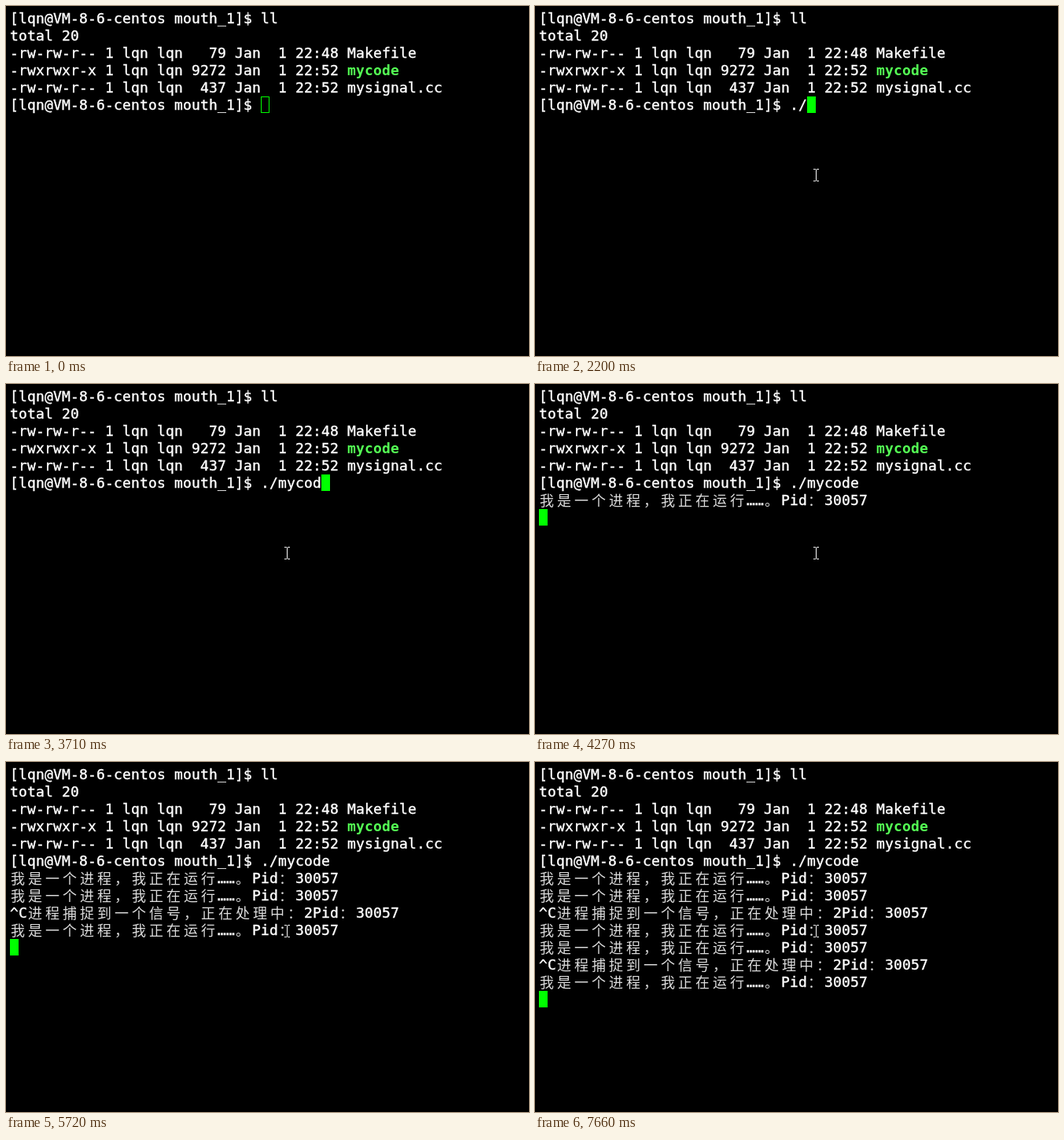
Animation of 665x445 px, one loop 8 s. Source, as an HTML page with a canvas:

```html
<!DOCTYPE html>
<html lang="zh-CN">
<head>
<meta charset="utf-8">
<title>Terminal</title>
<style>
html, body { margin: 0; width: 100%; height: 100%; overflow: hidden; background: #000; }
canvas { display: block; }
</style>
</head>
<body>
<canvas width="665" height="445"></canvas>
<script>
const ctx = document.querySelector('canvas').getContext('2d');
const LOOP = 8000, CELL = 11, LINE = 22, ORIGIN = 5;
const MONO = '18px "DejaVu Sans Mono", monospace';
const CJK = '300 18px "Noto Sans CJK SC", "Noto Sans CJK", sans-serif';
const WHITE = '#fff', SOFT_WHITE = '#dcdcdc', LIGHT_GREEN = '#54ff54', GREEN = '#0f0';

const PROMPT = '[lqn@VM-8-6-centos mouth_1]$ ';
const LISTING = [
  PROMPT + 'll',
  'total 20',
  '-rw-rw-r-- 1 lqn lqn   79 Jan  1 22:48 Makefile',
  '-rwxrwxr-x 1 lqn lqn 9272 Jan  1 22:52 ',
  '-rw-rw-r-- 1 lqn lqn  437 Jan  1 22:52 mysignal.cc'
];
const COMMAND = './mycode';
const KEY_TIMES = [2070, 2200, 3000, 3200, 3470, 3570, 3710, 3940];
const FOCUS = 1330, ENTER = 4220;

const RUNNING = '我是一个进程，我正在运行……。Pid：30057';
const CAUGHT = '^C进程捕捉到一个信号，正在处理中：2Pid：30057';
const OUTPUT = [
  [4270, RUNNING], [5250, RUNNING], [5720, CAUGHT], [5720, RUNNING],
  [6700, RUNNING], [7660, CAUGHT], [7660, RUNNING]
];

const POINTER = { start: 190, end: 720, steps: 11, from: [124, 438], to: [357, 215] };

const isWide = ch => /[\u3000-\u9fff\uff00-\uffef]/.test(ch);
const cellX = col => ORIGIN + col * CELL;
const rowY = row => ORIGIN + row * LINE;

// Writes text on the character grid and returns the next free column.
function write(text, row, col = 0) {
  const baseline = rowY(row) + 17;
  ctx.strokeStyle = WHITE;
  ctx.lineWidth = 0.4;
  for (const ch of text) {
    const x = cellX(col);
    if (isWide(ch)) {
      ctx.font = CJK;
      ctx.fillStyle = SOFT_WHITE;
      ctx.fillText(ch, x + 1, baseline + 1);
      col += 2;
    } else {
      ctx.font = MONO;
      ctx.fillStyle = WHITE;
      ctx.fillText(ch, x, baseline);
      ctx.strokeText(ch, x, baseline);
      col++;
    }
  }
  return col;
}

function writeExecutable(name, row, col) {
  ctx.font = 'bold ' + MONO;
  ctx.fillStyle = LIGHT_GREEN;
  [...name].forEach((ch, i) => ctx.fillText(ch, cellX(col + i), rowY(row) + 17));
}

function drawCursor(row, col, filled) {
  const x = cellX(col), y = rowY(row);
  ctx.fillStyle = ctx.strokeStyle = GREEN;
  ctx.lineWidth = 1;
  if (filled) ctx.fillRect(x, y, CELL, LINE - 1);
  else ctx.strokeRect(x + 0.5, y + 0.5, CELL - 1, LINE - 2);
}

function drawPointer(t) {
  const { start, end, steps, from, to } = POINTER;
  if (t < start) return;
  const progress = Math.min(1, Math.floor((t - start) / (end - start) * steps) / steps);
  const eased = 1 - (1 - progress) ** 2;
  const [x, y] = from.map((a, i) => Math.round(a + (to[i] - a) * eased));
  ctx.fillStyle = WHITE;
  for (const edge of [y - 8, y + 7]) {
    ctx.fillRect(x - 3, edge, 3, 1);
    ctx.fillRect(x + 1, edge, 3, 1);
  }
  ctx.fillRect(x, y - 7, 1, 14);
}

function draw(t) {
  ctx.fillStyle = '#000';
  ctx.fillRect(0, 0, 665, 445);

  LISTING.forEach((line, row) => write(line, row));
  writeExecutable('mycode', 3, LISTING[3].length);

  let row = LISTING.length;
  const typed = KEY_TIMES.filter(time => time <= t).length;
  let col = write(PROMPT + COMMAND.slice(0, typed), row);
  if (t >= ENTER) {
    row++;
    col = 0;
  }
  for (const [time, line] of OUTPUT) if (t >= time) write(line, row++);

  drawCursor(row, col, t >= FOCUS);
  drawPointer(t);
}

const began = performance.now();
function tick() {
  draw((performance.now() - began) % LOOP);
  requestAnimationFrame(tick);
}
tick();
</script>
</body>
</html>
```
